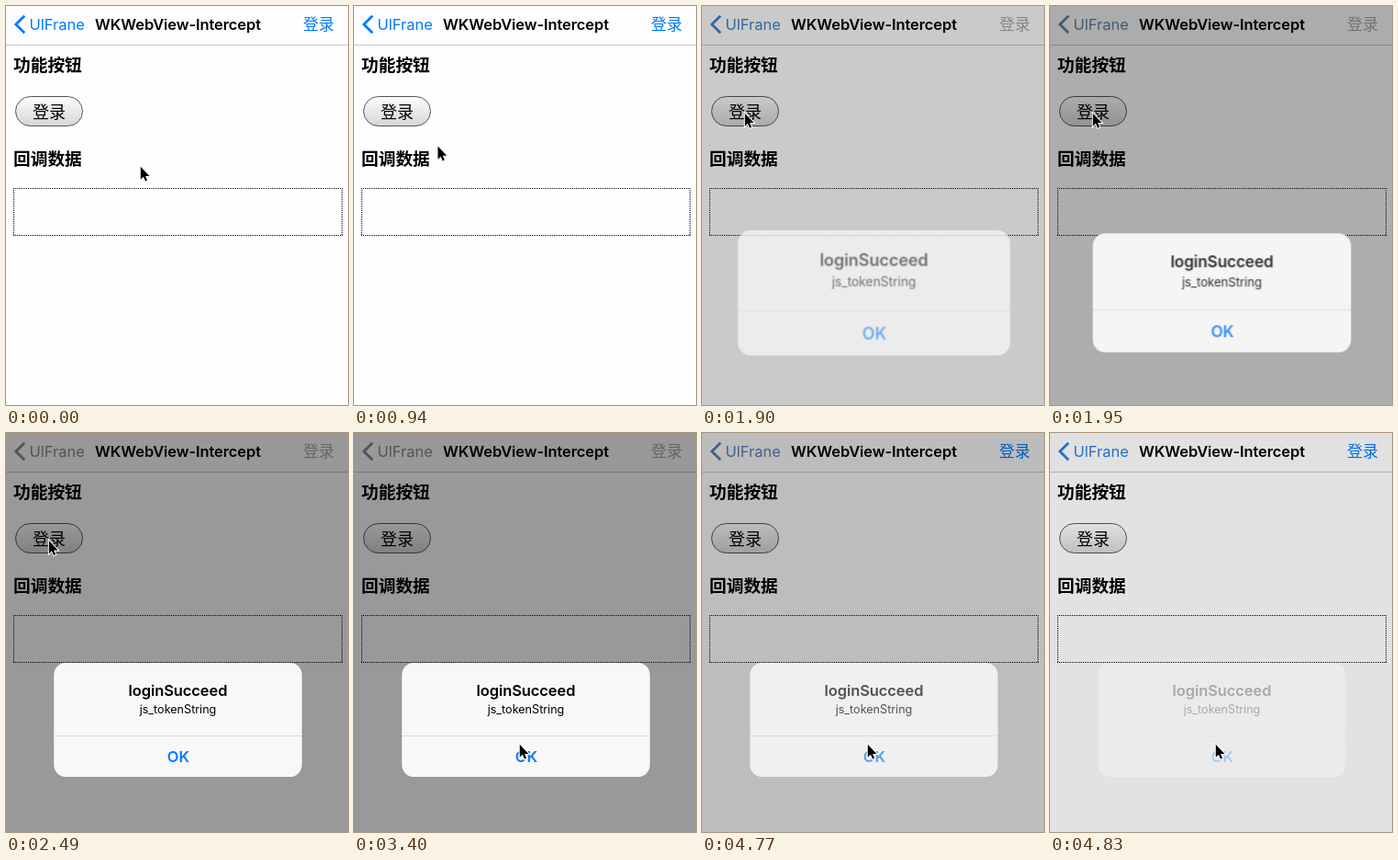
Recreate the animation shown at these times as an HTML page. Size 373 by 434 pixels, loop 4930 ms.

```html
<!DOCTYPE html>
<html lang="zh-CN">
<head>
<meta charset="utf-8">
<title>WKWebView-Intercept</title>
<style>
  html, body { margin: 0; width: 373px; height: 434px; overflow: hidden; background: #fefefe; }
  body { position: relative; }
  svg { position: absolute; left: 0; top: 0; display: block; }
  text { font: 400 16.5px Inter, "Noto Sans CJK SC", "Noto Sans CJK", sans-serif; }
  .zh { font-family: "Noto Sans CJK SC", "Noto Sans CJK", sans-serif; }
  .mid { text-anchor: middle; }
  .semi { font-weight: 600; }
  .h3 { font-size: 18.72px; font-weight: 700; }

  .back, .action, .tap, .dim, .alert, .press, .cursor { animation: 4.93s linear infinite; }

  .back { color: #007aff; animation-name: back; }
  .action { fill: #007aff; animation-name: action; animation-timing-function: step-end; }
  .tap { opacity: 0; animation-name: tap; animation-timing-function: step-end; }
  .dim { opacity: 0; animation-name: fade; }
  .alert { opacity: 0; transform-origin: 187.5px 312px; animation-name: fade, settle; }
  .press { opacity: 0; animation-name: press; }
  .cursor {
    width: 12px; height: 18px; overflow: visible;
    offset-path: path("M146.3 174.2 Q91.3 162.2 46.3 116.2 Q65.3 267.2 180.3 338.2");
    offset-anchor: 0 0; offset-rotate: 0deg;
    animation-name: travel;
    animation-timing-function: cubic-bezier(.65, 0, .35, 1);
  }

  @keyframes travel {
    0%, 9.331% { offset-distance: 0%; }
    28.702%, 49.797% { offset-distance: 30.4%; }
    69.27%, 100% { offset-distance: 100%; }
  }
  @keyframes tap {
    0% { opacity: 0; }
    35.497% { opacity: 1; }
    38.54%, 100% { opacity: 0; }
  }
  @keyframes fade {
    0%, 38.539% { opacity: 0; }
    38.54% { opacity: .5; }
    39.554% { opacity: .8; }
    40.771% { opacity: .93; }
    41.988% { opacity: .975; }
    44.422%, 95.538% { opacity: 1; }
    96.755% { opacity: .65; }
    97.972%, 100% { opacity: .27; }
  }
  @keyframes settle {
    0%, 38.54% { transform: scale(1.1); }
    39.554% { transform: scale(1.042); }
    40.771% { transform: scale(1.014); }
    41.988% { transform: scale(1.005); }
    44.422%, 100% { transform: scale(1); }
  }
  @keyframes back {
    0%, 38.539% { color: #007aff; }
    38.54% { color: #3e80c8; }
    39.554% { color: #6485a8; }
    41.988%, 95.538% { color: #8a8a8a; }
    97.972%, 100% { color: #287fd8; }
  }
  @keyframes action {
    0% { fill: #007aff; }
    38.54% { fill: #a8a8a8; }
    95.538%, 100% { fill: #007aff; }
  }
  @keyframes press {
    0%, 92.088% { opacity: 0; }
    92.089%, 94.32% { opacity: 1; }
    95.538%, 100% { opacity: 0; }
  }
</style>
</head>
<body>
<svg width="373" height="434" viewBox="0 0 373 434">
  <defs>
    <linearGradient id="gloss" x2="0" y2="1">
      <stop offset="0" stop-color="#fdfdfd"/>
      <stop offset="1" stop-color="#d6d6d6"/>
    </linearGradient>
    <clipPath id="card"><rect x="52.5" y="250" width="270" height="124" rx="13"/></clipPath>
  </defs>

  <!-- Navigation bar -->
  <rect width="373" height="42" fill="#fdfdfd"/>
  <rect y="42" width="373" height="1" fill="#c6c6c6"/>
  <g class="back">
    <path d="M20.2 10.7 10.8 20l9.4 9.3" fill="none" stroke="currentColor" stroke-width="2.8"/>
    <text x="25.5" y="26" fill="currentColor">UlFrane</text>
  </g>
  <text class="mid semi" x="187.5" y="26" letter-spacing="-.1">WKWebView-Intercept</text>
  <text class="zh action" x="324" y="26.4" style="font-size:17px">登录</text>

  <!-- Page -->
  <text class="zh h3" x="8" y="71.2">功能按钮</text>
  <rect x="10.5" y="98.5" width="73" height="32" rx="16" fill="url(#gloss)" stroke="#555"/>
  <text class="zh mid" x="47" y="121.6" style="font-size:18px">登录</text>
  <rect class="tap" x="8" y="96.5" width="78" height="36.5" rx="18" fill-opacity=".29"/>
  <text class="zh h3" x="8" y="173.2">回调数据</text>
  <path d="M8 198.5H367M8 249.5H367M8.5 198V250M366.5 198V250" stroke="#000" stroke-dasharray="1"/>

  <!-- Alert: the backing makes the panel fade in ahead of its text -->
  <rect class="dim" width="373" height="434" fill-opacity=".4"/>
  <rect class="alert" x="52.5" y="250" width="270" height="124" rx="13" fill="#f8f8f8"/>
  <g class="alert">
    <g clip-path="url(#card)">
      <rect x="52" y="250" width="271" height="124" fill="#f8f8f8"/>
      <rect class="press" x="52" y="330" width="271" height="44" fill="#e8e8e8"/>
      <rect x="52" y="329" width="271" height="1" fill="#d9d9d9"/>
    </g>
    <text class="mid semi" x="187.5" y="285.5" letter-spacing="-.1">loginSucceed</text>
    <text class="mid" x="187.5" y="305.3" style="font-size:12.6px">js_tokenString</text>
    <text class="mid semi" x="188" y="358" fill="#007aff">OK</text>
  </g>
</svg>

<svg class="cursor" viewBox="0 0 12 18">
  <path d="M0.5 0.5V14.6L3.6 11.6 5.7 16.4 7.8 15.5 5.8 10.8H10.2Z" stroke="#fff" stroke-width="2" paint-order="stroke"/>
</svg>
</body>
</html>
```
